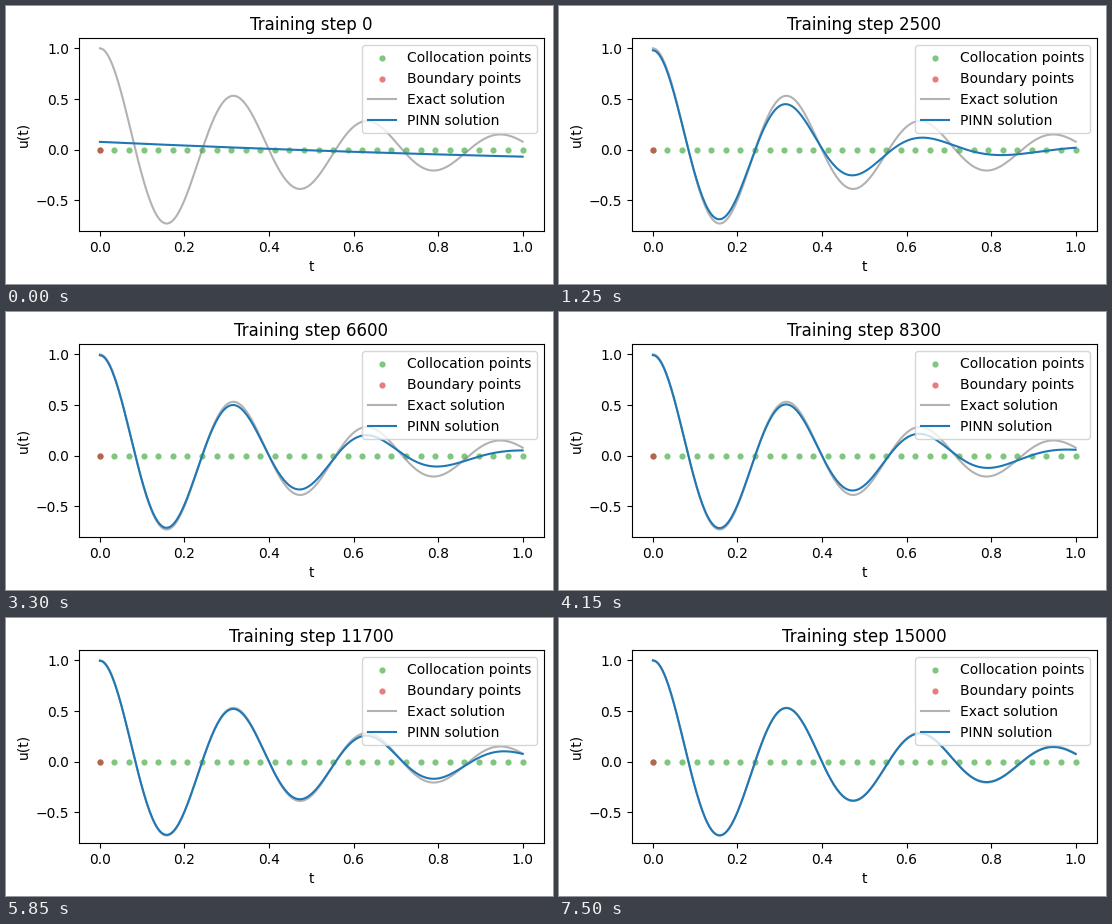
Recreate the animation shown at these times as a matplotlib script. Size 547 by 278 pixels, loop 7.55 s.

```python
import numpy as np
import matplotlib.pyplot as plt
from matplotlib.animation import FuncAnimation

WIDTH, HEIGHT, DPI = 547, 278, 100
FRAMES, INTERVAL, STEPS_PER_FRAME = 151, 50, 100
AX_W, AX_H, PAD = 465, 192.5, 10

DAMPING, OMEGA0 = 2, 20
OMEGA = np.sqrt(OMEGA0**2 - DAMPING**2)
PHASE = np.arctan(-DAMPING / OMEGA)


def oscillator(t):
    """Under-damped oscillator with u(0) = 1 and u'(0) = 0."""
    return np.exp(-DAMPING * t) * np.cos(PHASE + OMEGA * t) / np.cos(PHASE)


def learned(t, step):
    """Exact solution behind a soft front that moves along t with training."""
    x = step / (STEPS_PER_FRAME * (FRAMES - 1))
    growth = 1 - np.exp(-x / .12)
    front = .81 * growth - .09 + 1.05 * x**5
    width = .08 + .115 * front
    floor = .24 * growth
    gain = floor + (1 - floor) / (1 + np.exp((t - front) / width))
    delay = .12 * (1 - x)**1.2 * t**(3 + 8 * x)
    initial = .077 - .19 * t + .044 * t**2
    ramp = 1 - np.exp(-step / 250)
    return np.exp(-step / 130) * initial + ramp * gain * oscillator(t - delay)


t = np.linspace(0, 1, 300)
t_physics = np.linspace(0, 1, 30)

fig = plt.figure(figsize=(WIDTH / DPI, HEIGHT / DPI), dpi=DPI)
ax = fig.add_axes([72.5 / WIDTH, 53 / HEIGHT, AX_W / WIDTH, AX_H / HEIGHT])
dots = dict(s=20, lw=0, alpha=0.6)
ax.scatter(t_physics, 0 * t_physics, color="tab:green",
           label="Collocation points", **dots)
ax.scatter([0], [0], color="tab:red", label="Boundary points", **dots)
ax.plot(t, oscillator(t), color="tab:gray", alpha=0.6, label="Exact solution")
curve, = ax.plot(t, learned(t, 0), color="tab:blue", label="PINN solution")
title = ax.set_title("Training step 0")
ax.set(xlabel="t", ylabel="u(t)", xlim=(-0.05, 1.05), ylim=(-0.8, 1.1))
ax.legend(loc="upper right")

# Move the axes so the labels keep an even padding at the left and bottom.
fig.draw_without_rendering()
tight, box = fig.get_tightbbox(), ax.get_position()
ax.set_position([box.x0 + (PAD - tight.x0 * DPI) / WIDTH,
                 box.y0 + (PAD - tight.y0 * DPI) / HEIGHT,
                 box.width, box.height])
ax.tick_params(axis="x", pad=3.7)


def update(frame):
    step = frame * STEPS_PER_FRAME
    curve.set_ydata(learned(t, step))
    title.set_text(f"Training step {step}")
    return curve, title


anim = FuncAnimation(fig, update, frames=FRAMES, interval=INTERVAL,
                     repeat=True, repeat_delay=0, blit=False)
plt.show()
```
